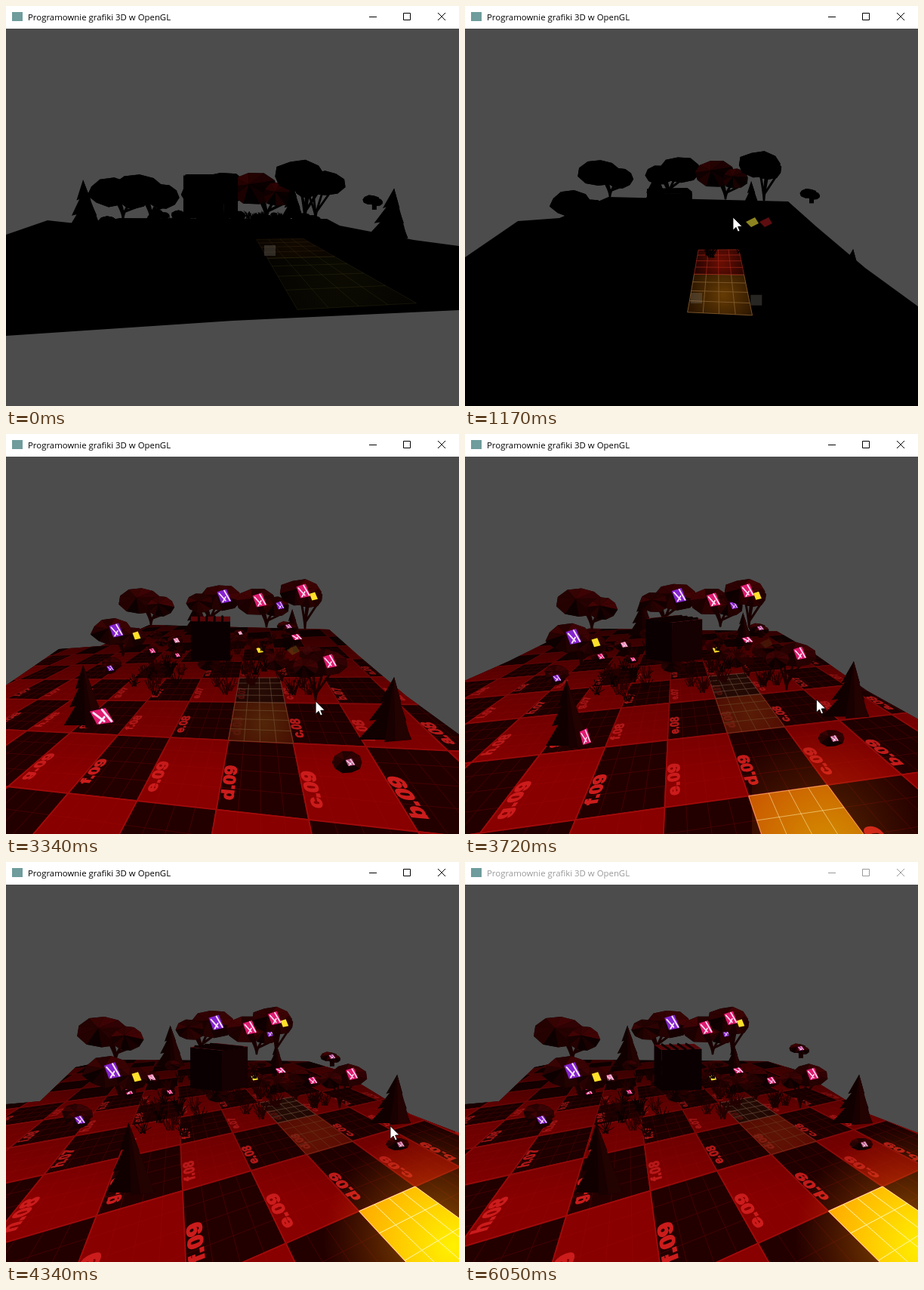
Write an HTML page with a canvas that moves like this. It is 600 px wide and 530 px high and loops after 6130 ms.

```html
<!DOCTYPE html>
<html lang="pl">
<head>
<meta charset="utf-8">
<title>Programownie grafiki 3D w OpenGL</title>
<style>
html, body { margin: 0; width: 100%; height: 100%; overflow: hidden; background: #4c4c4c; }
canvas { display: block; }
</style>
</head>
<body>
<canvas id="stage" width="600" height="530"></canvas>
<script>
const g = document.getElementById('stage').getContext('2d');
const LOOP = 6130;
let time, near, turned, settled, light, drift, M;

const clamp = v => Math.min(1, Math.max(0, v));
const ramp = (from, to) => clamp((time - from) / (to - from));
const mix = (a, b, f) => a + (b - a) * f;
const rand = n => { const v = Math.sin(n * 127.1 + 3.7) * 43758.5453; return v - Math.floor(v); };
const rgb = (r, gr, b) => `rgb(${r | 0},${gr | 0},${b | 0})`;

// Blend of three camera poses: far away, facing the hill, turned to the right
const posed = (far, facing, right) => facing.map((v, i) => turned > 0 ? mix(v, right[i], turned) : mix(far[i], v, near));
const shear = (x, y) => x + drift * (y - 300);

// Foot and scale of an object from its feet in the facing and turned poses
function place([bx, by], [cx, cy]) {
  const far = [bx, 281 + .5 * Math.max(0, by - 352), 1.2 - .0027 * (by - 255)];
  const [x, y, s] = posed(far, [bx, by, 1], [cx, cy, 1.35 - .0011 * cx]);
  return [shear(x, y), y, s];
}

// Ground plane from the vanishing points of its two axes and the screen origin
function plane([ux, uy, ku], [tx, ty, kt], [x, y]) {
  return [ux * ku, uy * ku, ku, tx * kt, ty * kt, kt, x, y];
}
const PLANES = [
  plane([3000, 260, .03], [300, 255, -.4], [350, 324]),
  plane([-1200, 335, -.05], [334, 181, -.267], [307, 387]),
  plane([1100, 180, .085], [215, 199, -.258], [397, 370])];

function project(u, t) {
  const w = 1 + M[2] * u + M[5] * t, y = (M[1] * u + M[4] * t + M[7]) / w;
  return [shear((M[0] * u + M[3] * t + M[6]) / w, y), y, w];
}

function trace(points) {
  g.beginPath();
  points.forEach(p => g.lineTo(p[0], p[1]));
  g.closePath();
}
function poly(points, fill) { trace(points); g.fillStyle = fill; g.fill(); }
function line(a, b) { g.moveTo(a[0], a[1]); g.lineTo(b[0], b[1]); }
function stroke(color, width) { g.strokeStyle = color; g.lineWidth = width; g.stroke(); }

const LEFT = -.12, FRONT = .32;   // tile edges relative to its label
const tile = (c, r) => [[0, 1], [1, 1], [1, 0], [0, 0]].map(([x, y]) => project(c + LEFT + x, r + FRONT - y));

function tileGrid(c, r, parts, color, width) {
  g.beginPath();
  for (let i = 0; i <= parts; i++) {
    const u = c + LEFT + i / parts, t = r + FRONT - i / parts;
    line(project(u, r + FRONT - 1), project(u, r + FRONT));
    line(project(c + LEFT, t), project(c + LEFT + 1, t));
  }
  stroke(color, width);
}

function label(c, r) {
  const [x, y, w] = project(c, r);
  if (w < .05 || w > 1.6 || x < -40 || x > 640 || y > 580) return;
  const a = project(c + .01, r), b = project(c, r + .01);
  g.save();
  g.transform(x - b[0], y - b[1], a[0] - x, a[1] - y, x, y);
  g.font = 'bold 22px "Liberation Sans", sans-serif';
  g.textAlign = 'center';
  g.textBaseline = 'middle';
  g.fillStyle = g.strokeStyle = '#cc1c1c';
  g.lineWidth = 1.5;
  const text = String.fromCharCode(100 - c) + '.' + String(8 + r).padStart(2, '0');
  g.fillText(text, 0, 0);
  g.strokeText(text, 0, 0);
  g.restore();
}

// A lamp pool lying on one tile
function lampTile(c, r, inner, outer, grid, alpha) {
  const q = tile(c, r);
  if (alpha <= 0 || q.some(p => p[2] < .08)) return;
  const x = (q[0][0] + q[2][0]) / 2, y = (q[0][1] + q[2][1]) / 2;
  const fill = g.createRadialGradient(x, y, 2, x, y, Math.abs(q[2][0] - q[0][0]) * .7 + 8);
  fill.addColorStop(0, inner);
  fill.addColorStop(1, outer);
  g.globalAlpha = alpha;
  poly(q, fill);
  tileGrid(c, r, 4, grid, 1);
  g.globalAlpha = 1;
}

const RIDGES = [
  [[0, 303], [55, 284], [110, 290], [150, 281], [425, 282], [442, 291], [540, 310], [600, 318]],
  [[0, 333], [70, 285], [125, 281], [190, 253], [428, 259], [465, 292], [530, 347], [600, 398]],
  [[0, 321], [45, 317], [92, 272], [140, 262], [400, 264], [440, 276], [535, 334], [600, 359]]];

function ground() {
  const ridge = RIDGES[0].map((p, i) => posed(p, RIDGES[1][i], RIDGES[2][i]));
  const sink = 340 * near;
  g.save();
  poly([...ridge, [600, 403 + sink], [300, 417 + sink], [0, 437 + sink]], '#010000');
  g.clip();
  if (light > 0) {
    g.globalAlpha = light;
    for (let r = -9; r <= 2; r++) for (let c = -12; c <= 7; c++) {
      const q = tile(c, r), dark = (c + r) & 1;
      if (q.some(p => p[2] < .05)) continue;
      poly(q, dark ? '#230000' : '#880000');
      if (r > -4) tileGrid(c, r, 4, dark ? '#4c0303' : '#920404', .8);
      tileGrid(c, r, 1, '#a00a0a', 1.8 / Math.max(1, q[0][2]));
    }
    for (let r = -3; r <= 2; r++) for (let c = -8; c <= 5; c++) label(c, r);
    const fog = g.createLinearGradient(0, 255, 0, 450);
    fog.addColorStop(0, 'rgba(0,0,0,.68)');
    fog.addColorStop(.4, 'rgba(0,0,0,.25)');
    fog.addColorStop(1, 'rgba(0,0,0,0)');
    g.fillStyle = fog;
    g.fillRect(0, 190, 600, 340);
    g.globalAlpha = 1;
  }
  const night = 1 - light;
  lampTile(0, 0, '#6e4004', '#1a0a00', '#80592c', (.15 + .75 * near) * night);
  lampTile(0, -1, '#8a1204', '#060000', '#9a2418', .75 * near * night);
  lampTile(0, 1, '#2e2c08', '#000', '#4a4818', .25 * (1 - near));
  lampTile(0, 0, '#46300a', '#300a00', '#6a4a2a', light * mix(.75, .4, turned));
  lampTile(0, -1, '#2c1408', '#1c0300', '#665040', light * .6);
  for (const c of [0, 1]) {
    const [x, y] = project(c, 0);
    g.fillStyle = `rgba(130,125,115,${.3 * night * (c ? near : 1)})`;
    g.fillRect(x - 8, y - 7, 15, 14);
  }
  if (turned > 0) {
    const [x, y] = project(.4, 1.8);
    const glow = g.createRadialGradient(x, y, 20, x, y, 150);
    glow.addColorStop(0, `rgba(255,170,0,${.4 * turned})`);
    glow.addColorStop(1, 'rgba(255,110,0,0)');
    g.fillStyle = glow;
    g.fillRect(380, 330, 220, 200);
    lampTile(0, 2, '#fff000', '#ff9000', '#fff6b0', turned);
  }
  g.restore();
}

// Faceted round shape
function blob(x, y, rx, ry, seed, warm = 0) {
  const n = 10, ring = [];
  for (let i = 0; i < n; i++) {
    const a = i / n * 6.283 + seed, k = .96 + rand(seed * 9 + i) * .14;
    ring.push([x + Math.cos(a) * rx * k, y + Math.sin(a) * ry * k]);
  }
  poly(ring, rgb(1 + 22 * light, 0, 0));
  const core = [x - rx * .2, y - ry * .25];
  ring.forEach((p, i) => {
    const q = ring[(i + 1) % n], top = p[1] + q[1] < 2 * y ? 22 : 0;
    const red = (12 + top + 30 * rand(seed + i * 5)) * light + warm * (1 - light) * rand(i + seed);
    poly([core, p, q], rgb(red + 1, red * .06, red * .07));
  });
}

// Bright slanted patch of texture
function mark(x, y, w, h, color) {
  if (!color || light <= 0 || w < 1) return;
  const at = (px, py) => [x + px * w, y + py * h];
  g.globalAlpha = light;
  poly([at(-.5, -.3), at(.15, -.5), at(.5, .35), at(-.2, .5)], color);
  if (color !== YELLOW) {
    g.beginPath();
    line(at(-.35, -.2), at(.1, .3));
    line(at(0, -.4), at(.4, .3));
    line(at(.1, .05), at(-.1, .4));
    stroke('#ffe6f6', Math.max(.8, w * .09));
  }
  g.globalAlpha = 1;
}

const YELLOW = '#ffe02a', PURPLE = '#8424d0', PINK = '#e01c70';
// side: where the large crown leans; lift: extra trunk; big, small: patches on the crowns
const TREES = [
  { b: [192, 252], c: [142, 262], side: -1, lift: 0 },
  { b: [270, 250], c: [254, 250], side: 1, lift: 2, big: PURPLE },
  { b: [345, 255], c: [328, 254], side: -1, lift: 2, big: PINK, small: PURPLE, warm: 45 },
  { b: [396, 257], c: [354, 254], side: -.5, lift: 16, big: PINK, small: YELLOW },
  { b: [155, 293], c: [153, 315], side: -1, lift: 0, small: YELLOW, big: PURPLE },
  { b: [410, 352], c: [444, 325], side: 1, lift: 18, big: PINK, small: '' }];

function tree({ b, c, side, lift, big, small, warm }, i) {
  const [x, y, s] = place(b, c);
  const crowns = [
    { x: x + 14 * side * s, y: y - (31 + lift) * s, rx: 27 * s, ry: 17 * s, color: big, size: 19 },
    { x: x - 13 * side * s, y: y - (24 + lift) * s, rx: 17 * s, ry: 13 * s, color: small, size: 11 }];
  g.lineCap = 'round';
  g.beginPath();
  crowns.forEach(p => {
    g.moveTo(x, y);
    g.quadraticCurveTo(x, y - 8 * s, p.x, p.y);
    line([x, y - 7 * s], [p.x + 10 * s, p.y + 8 * s]);
  });
  stroke(rgb(1 + 24 * light, 0, 0), 3 * s);
  crowns.forEach((p, k) => blob(p.x, p.y, p.rx, p.ry, i * 3 + k + 1, warm));
  crowns.forEach(p => mark(p.x + 5 * s, p.y - 2, p.size * s, p.size * s, p.color));
}

const PINES = {
  left: { b: [102, 386], c: [174, 438], h: 80, w: 54, lean: .05 },
  right: { b: [514, 405], c: [522, 346], h: 83, w: 68, lean: -.18 },
  mid: { b: [379, 272], c: [356, 279], h: 40, w: 25, lean: 0 },
  back: { b: [252, 262], c: [215, 270], h: 48, w: 33, lean: 0 }};

function pine({ b, c, h, w, lean }) {
  const [x, foot, s] = place(b, c), y = foot - h * s;
  const at = (k, f) => [x + (lean + k) * w * s * f, y + h * s * f];
  const side = (k, notch) => [.4, .7, 1].flatMap(f => f < 1 ? [at(k, f), at(k * notch, f - .02)] : [at(k, f)]);
  const left = side(-.52, .62), right = side(.52, .85);
  poly([[x, y], ...right, ...left.reverse()], rgb(1 + 15 * light, 0, 0));
  poly([[x, y], ...right, at(0, 1.04)], rgb(1 + 24 * light, 0, light));
  poly([[x, y], at(.5, 1), at(.2, 1.02)], rgb(1 + 34 * light, 2 * light, 2 * light));
}

function scatter() {
  const tints = [PINK, PURPLE, YELLOW, '#f080b0'];
  for (let i = 0; i < 26; i++) {
    const [x, y, w] = project(-4.5 + rand(i) * 6.5, -6 + rand(i + 40) * 4.2);
    const s = (8 + 10 * rand(i + 80)) / w * 1.5;
    blob(x, y - s * .4, s, s * .65, i + 30);
    if (i % 3 === 0) mark(x + s * .2, y - s * .4, s * .9, s * .7, tints[i % 4]);
  }
  for (let i = 0; i < 60; i++) {
    const [x, y, w] = project(-3 + rand(i + 200) * 4.6, -4.5 + rand(i + 300) * 3.7);
    const s = 21 / w;
    g.beginPath();
    for (let k = 0; k < 13; k++)
      line([x + (rand(k + i) - .5) * s * .5, y], [x + (k - 6) / 6 * s * .6, y - s * (.4 + .8 * rand(i * 11 + k))]);
    stroke(rgb(1 + (8 + 32 * rand(i + 7)) * light, 0, 0), 1);
  }
}

function cube() {
  const [cx, foot, s] = place([271, 297], [282, 299]);
  const a = 26 * s, cy = foot - a, turn = 2.25 * (time - 3340) / 1000;
  const glow = clamp(1.2 - Math.abs(time - 2100) / 700) * (1 - light);
  const corner = (n, dy) => [cx + Math.cos(n) * a * 1.414, cy + dy + Math.sin(n) * a * .18 * near];
  for (let k = 0; k < 4; k++) {
    const n = turn + k * Math.PI / 2, nx = Math.cos(n);
    if (Math.sin(n) < 0) continue;
    const l = n + Math.PI / 4, r = n - Math.PI / 4;
    const q = [corner(l, -a), corner(r, -a), corner(r, a), corner(l, a)];
    const toLamp = nx > .35, base = rgb(1 + (toLamp ? 20 : 9) * light, 0, 2 * light);
    const fill = g.createLinearGradient(q[0][0], 0, q[1][0] + .1, 0);
    const shade = (r, gr, b) => glow > 0 ? rgb(r * glow, gr * glow, b * glow) : base;
    fill.addColorStop(0, toLamp ? shade(190, 165, 165) : base);
    fill.addColorStop(.5, toLamp ? shade(235, 220, 220) : base);
    fill.addColorStop(1, toLamp ? shade(255, 250, 248) : shade(42, 30, 56));
    poly(q, fill);
    if (toLamp || !glow) continue;
    g.beginPath();
    for (let i = 1; i < 7; i++) {
      const y = cy + a * (i / 3.5 - 1);
      line([mix(q[0][0], q[1][0], .55), y], [q[1][0], y]);
    }
    stroke(`rgba(95,75,120,${glow * .45})`, 1);
  }
  const top = [1, 3, 5, 7].map(k => corner(turn + k * Math.PI / 4, -a));
  poly(top, rgb(1 + 85 * light, 6 * light, 8 * light));
  g.beginPath();
  for (let f = .2; f < 1; f += .2) {
    const on = (p, q) => [mix(p[0], q[0], f), mix(p[1], q[1], f)];
    line(on(top[0], top[1]), on(top[3], top[2]));
  }
  stroke(rgb(14 * light, 0, 0), 3);
}

// Small tree circling behind the hill
function orbiter() {
  const a = (time - 5300) / 4600 * 2 * Math.PI;
  const x = 417 + 50 * Math.cos(a) + 40 * (1 - near), y = 253 - 6 * Math.sin(a);
  g.fillStyle = rgb(1 + 20 * light, 0, 0);
  g.fillRect(x - 1, y, 6, 12);
  blob(x - 2, y - 1, 11, 6, 61);
  blob(x + 5, y + 2, 8, 5, 62);
  mark(x + 2, y - 1, 9, 6, '#b04090');
}

function boulder() {
  const [x, y, s] = place([452, 435], [525, 374]);
  blob(x, y, 20 * s, mix(14, 10, turned) * s, 71);
  mark(x + 4, y, 13 * s, 10 * s, '#b85a88');
}

// Tinted leaves beside the near tree, seen before the camera turns
function leaves() {
  const [x, y, s] = place(TREES[5].b, TREES[5].c);
  g.globalAlpha = (1 - light * .7) * (1 - turned) * near;
  ['#8c8420', '#5c0d10'].forEach((color, i) => {
    const lx = x + (18 * i - 38) * s, ly = y - 66 * s;
    poly([[lx, ly], [lx + 12, ly - 6], [lx + 17, ly + 2], [lx + 7, ly + 7]], color);
  });
  g.globalAlpha = 1;
}

function titleBar() {
  const ink = time > 5850 ? '#999' : '#000';
  g.fillStyle = '#fff';
  g.fillRect(0, 0, 600, 30);
  g.fillStyle = '#6f9c9c';
  g.fillRect(8, 8, 14, 12);
  g.fillStyle = ink;
  g.font = '11.4px "Open Sans", "Noto Sans", sans-serif';
  g.textAlign = 'left';
  g.textBaseline = 'alphabetic';
  g.fillText('Programownie grafiki 3D w OpenGL', 29, 19);
  g.lineCap = 'butt';
  g.beginPath();
  g.rect(526.5, 9.5, 9, 9);
  line([481, 14.5], [491, 14.5]);
  line([572, 9], [582, 19]);
  line([582, 9], [572, 19]);
  stroke(ink, 1);
}

function pointer() {
  if (time < 700 || time > 1330 && time < 3040 || time > 5650) return;
  let x = 355, y = 280;
  if (time > 3040) {
    const across = ramp(3340, 4020), up = ramp(4340, 4940);
    x = 410 + 99 * across + 17 * up;
    y = 354 - 4 * across - 108 * up;
  }
  trace([[0, 0], [0, 17], [4, 13.3], [6.5, 19], [9, 18], [6.6, 12.3], [12, 12]].map(p => [x + p[0], y + p[1]]));
  g.fillStyle = '#fff';
  g.fill();
  stroke('#000', .8);
}

function draw(now) {
  time = now % LOOP;
  near = ramp(80, 1120);
  light = ramp(3000, 3280);
  turned = ramp(3420, 4000);
  settled = ramp(4360, 4920);
  drift = -.085 * turned * (1 - settled);
  M = posed(...PLANES);
  g.fillStyle = '#4c4c4c';
  g.fillRect(0, 0, 600, 530);
  ground();
  pine(PINES.back);
  [0, 1, 2, 3].forEach(i => tree(TREES[i], i));
  pine(PINES.mid);
  orbiter();
  scatter();
  tree(TREES[4], 4);
  cube();
  pine(PINES.left);
  const [px, py, ps] = place(PINES.left.b, PINES.left.c);
  mark(px + 25, py - 12, 32 * (1 - turned), 22, PINK);
  const [mx, my, ms] = place(PINES.mid.b, PINES.mid.c);
  mark(mx + 6, my - 3, 15 * ms, 8 * ms, PINK);
  pine(PINES.right);
  tree(TREES[5], 5);
  leaves();
  boulder();
  titleBar();
  pointer();
}

const start = performance.now();
function step() {
  draw(performance.now() - start);
  requestAnimationFrame(step);
}
step();
</script>
</body>
</html>
```
